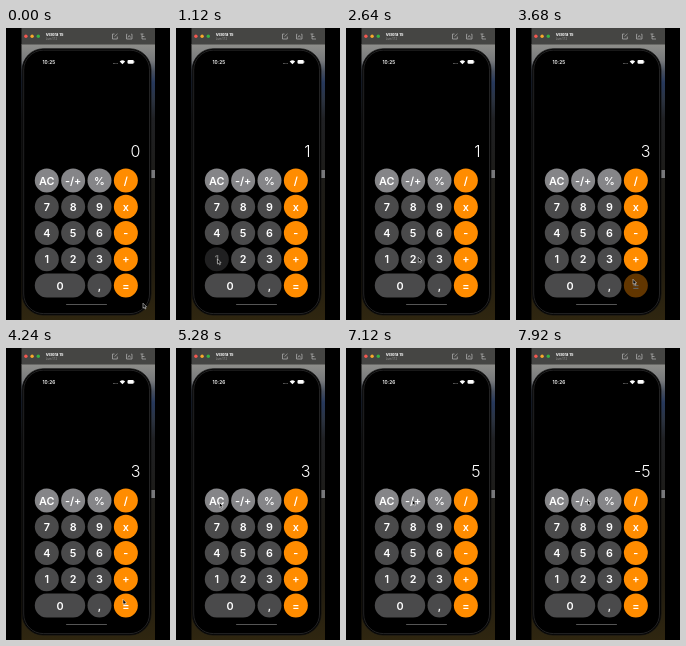
Recreate the animation shown at these times as an HTML page. Size 164 by 292 pixels, loop 8000 ms.

```html
<!DOCTYPE html>
<html lang="en">
<head>
<meta charset="utf-8">
<style>
html, body { margin: 0; width: 100%; height: 100%; overflow: hidden; background: #000; }
svg { display: block; width: 100vw; height: 100vh; }
text { font-family: Inter, Roboto, sans-serif; fill: #fff; }
.key text { font-size: 10.8px; font-weight: 600; text-anchor: middle; }
</style>
</head>
<body>
<svg viewBox="0 0 164 292">
  <defs>
    <linearGradient id="wall" x2="0" y2="1">
      <stop offset="0" stop-color="#8f8f8b"/>
      <stop offset=".06" stop-color="#77797b"/>
      <stop offset=".1" stop-color="#454d5c"/>
      <stop offset=".14" stop-color="#26385c"/>
      <stop offset=".2" stop-color="#2b3341"/>
      <stop offset=".27" stop-color="#202124"/>
      <stop offset=".5" stop-color="#1d1c18"/>
      <stop offset=".8" stop-color="#211c10"/>
      <stop offset="1" stop-color="#2f2610"/>
    </linearGradient>
  </defs>
  <rect width="164" height="292"/>
  <rect x="15.5" y="16" width="133.5" height="276" fill="url(#wall)"/>
  <rect x="145" y="142" width="4" height="8" fill="#77787a"/>
  <rect x="15.5" width="133.5" height="16.5" fill="#454543"/>
  <circle cx="19.9" cy="8.3" r="1.7" fill="#f4574f"/>
  <circle cx="26.1" cy="8.3" r="1.7" fill="#f6a82c"/>
  <circle cx="32.3" cy="8.3" r="1.7" fill="#35b144"/>
  <text x="39.8" y="8" font-size="4" font-weight="700">Velora 15</text>
  <text x="39.8" y="12" font-size="2.8" style="fill:#999">Lum 17.2</text>
  <g fill="none" stroke="#b5b5b5" stroke-width=".7">
    <path d="M108.5 6H106.5v5h4.8V8.5M108.5 8.6 111.5 5.8"/>
    <path d="M121.3 6.2h-.8v4.8h5.5V6.2h-.8M122 9.5l1.2-2 1.5 2"/>
    <path d="M134.5 6h3M136 6v5h4M136 8.5h2.5"/>
  </g>
  <rect x="16.2" y="20.8" width="128.8" height="266.2" rx="21" fill="#000" stroke="#111" stroke-width=".8"/>
  <rect x="17.7" y="22.2" width="125.8" height="263.4" rx="19.6" fill="none" stroke="#3b3b3d" stroke-width=".6"/>
  <text id="clock" x="36.5" y="36" font-size="4.8" font-weight="600"></text>
  <g fill="#fff">
    <path d="M107 35h.8v.8h-.8zM108.3 35h.8v.8h-.8zM109.6 35h.8v.8h-.8zM110.9 35h.8v.8h-.8z" opacity=".55"/>
    <path d="M113.7 33.5Q116.4 30.8 119.1 33.5L116.4 36.3z"/>
    <rect x="121.5" y="31.9" width="6.3" height="3.9" rx="1.2"/>
    <rect x="128.2" y="33.2" width=".6" height="1.4" opacity=".6"/>
  </g>
  <text id="display" x="134.5" y="128.7" font-size="16" font-weight="300" text-anchor="end"></text>
  <g id="keys"></g>
  <rect x="60" y="276" width="41" height="1" rx=".5" fill="#555"/>
  <path id="cursor" d="M0 0V5L1.2 4 2 5.8 2.9 5.4 2.1 3.7H3.6z" fill="#000" stroke="#fff" stroke-width=".5"/>
</svg>
<script>
const LOOP = 8000;
const $ = id => document.getElementById(id);
const rows = [
  ['AC', '-/+', '%', '/'],
  ['7', '8', '9', 'x'],
  ['4', '5', '6', '-'],
  ['1', '2', '3', '+'],
  ['0', '', ',', '=']
];
const keys = {};

function make(tag, attrs, parent) {
  const el = document.createElementNS('http://www.w3.org/2000/svg', tag);
  for (const k in attrs) el.setAttribute(k, attrs[k]);
  return parent.appendChild(el);
}

rows.forEach((row, r) => row.forEach((label, c) => {
  if (!label) return;
  const wide = label === '0', w = wide ? 50.4 : 24;
  const x = 28.8 + c * 26.35, y = 140.6 + r * 26.25;
  const fill = c === 3 ? '#ff8c00' : r ? '#4a4a4b' : '#858588';
  const g = make('g', { class: 'key' }, $('keys'));
  make('rect', { x, y, width: w, height: 24, rx: 12, fill }, g);
  make('text', { x: x + w / 2, y: y + 15.9 }, g).textContent = label;
  keys[label] = g;
}));

// release time, key, resulting display
const taps = [
  [1040, '1', '1'], [2120, '+', '1'], [2840, '2', '2'], [3660, '=', '3'],
  [5460, 'AC', '0'], [6260, '5', '5'], [7400, '-/+', '-5']
];

// time, cursor x, cursor y
const path = [
  [0, 137, 275.2], [80, 137, 275.2], [860, 41, 231], [1080, 41, 231],
  [1920, 107, 231.5], [2020, 112, 231.5], [2160, 112, 231.5], [2620, 72.3, 229.3],
  [2880, 72.3, 229.3], [3500, 117, 251.3], [4450, 117, 251.3],
  [5260, 43.5, 154.5], [5500, 43.5, 154.5], [6120, 68, 206], [6300, 68, 206],
  [7040, 66.3, 152], [7440, 67.3, 152], [7920, 71.5, 152], [LOOP, 71.5, 152]
];

function cursorAt(t) {
  const i = path.findIndex(p => p[0] > t);
  const a = path[i - 1], b = path[i];
  const u = (t - a[0]) / (b[0] - a[0]), e = u * u * (3 - 2 * u);
  return [a[1] + (b[1] - a[1]) * e, a[2] + (b[2] - a[2]) * e];
}

// Dims at once while held, then fades back after release
function keyOpacity(age) {
  if (age < -120 || age > 260) return 1;
  return age < 0 ? 0.38 : 0.38 + 0.62 * (age / 260) ** 2;
}

function draw(now) {
  const t = now % LOOP;
  let value = '0';
  for (const [time, key, result] of taps) {
    if (t >= time) value = result;
    keys[key].setAttribute('opacity', keyOpacity(t - time));
  }
  $('display').textContent = value;
  $('clock').textContent = t < 4000 ? '10:25' : '10:26';
  $('cursor').setAttribute('transform', `translate(${cursorAt(t)})`);
}

const start = performance.now();
function tick() {
  draw(performance.now() - start);
  requestAnimationFrame(tick);
}
tick();
</script>
</body>
</html>
```
